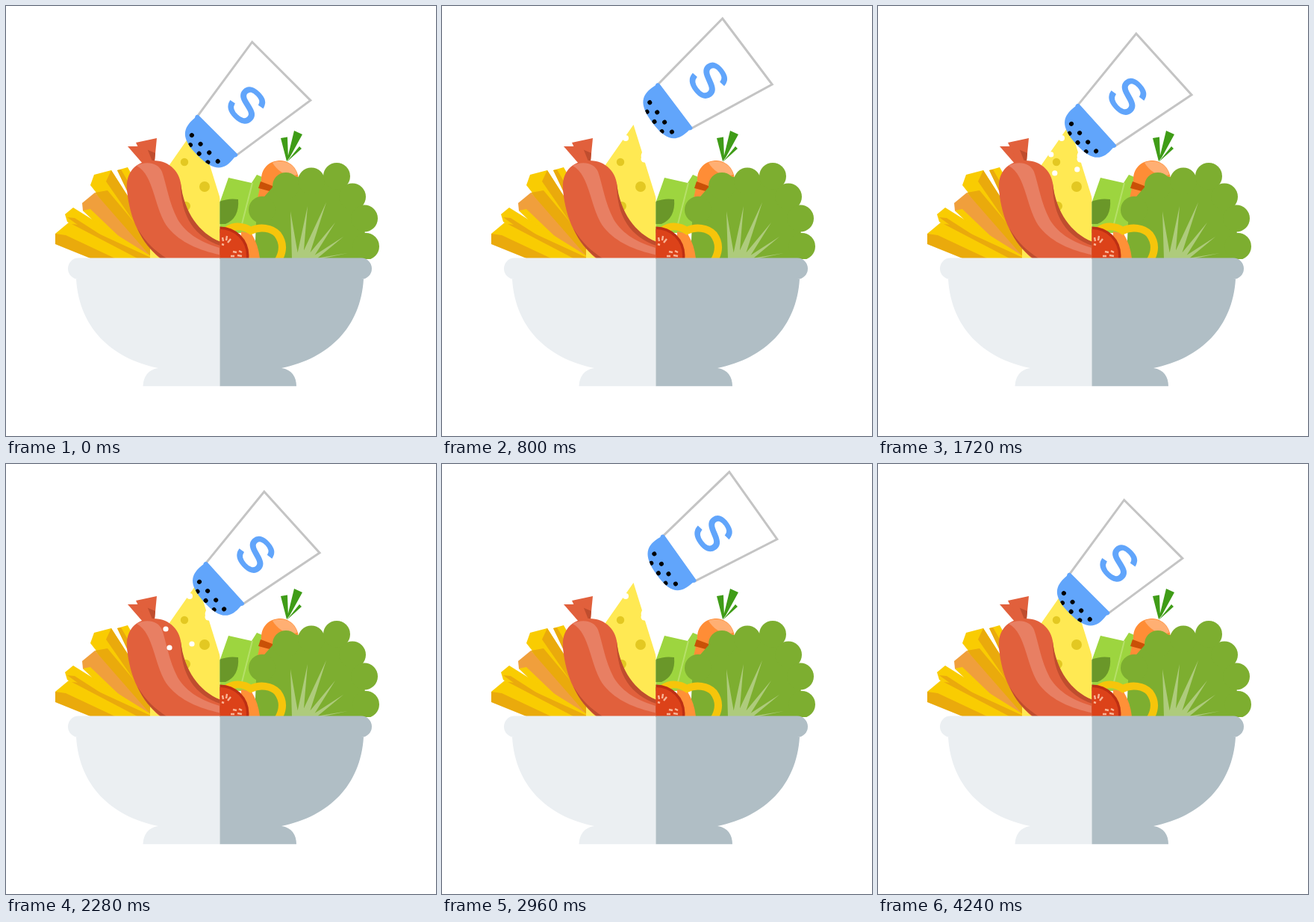
Animation of 576x576 px, one loop 4.28 s. Source, as an HTML page with a canvas:

```html
<!DOCTYPE html>
<html lang="en">
<head>
<meta charset="utf-8">
<title>Salad bowl</title>
<style>
html, body { margin: 0; width: 100%; height: 100%; overflow: hidden; background: #fff; }
canvas { display: block; width: 100vw; height: 100vh; }
</style>
</head>
<body>
<canvas></canvas>
<script>
const SIZE = 576, LOOP = 4280, STEP = 40, MID = 286.5, RIM = 338;
const canvas = document.querySelector('canvas');
const ctx = canvas.getContext('2d');

const fill = (color, d) => { ctx.fillStyle = color; ctx.fill(new Path2D(d)); };

function line(color, width, d) {
  ctx.strokeStyle = color;
  ctx.lineWidth = width;
  ctx.stroke(new Path2D(d));
}

function dots(color, r, points) {
  ctx.fillStyle = color;
  for (const [x, y] of points) {
    ctx.beginPath();
    ctx.arc(x, y, r, 0, 7);
    ctx.fill();
  }
}

function clipped(x, y, w, h, draw) {
  ctx.save();
  ctx.beginPath();
  ctx.rect(x, y, w, h);
  ctx.clip();
  draw();
  ctx.restore();
}

function drawFries() {
  const top = '#f9cc02', side = '#eaaa0c', front = '#f09f3c';
  fill(top, 'M149 220L163 216L180 246L168 258Z');
  fill(side, 'M149 220L154 219L172 250L166 256Z');
  fill(top, 'M113 240L118 226L141 220L205 320L190 338Z');
  fill(side, 'M141 220L205 320V338L134 235Z');
  fill(front, 'M102 264L119 250L204 338H172L103 274Z');
  fill(top, 'M103 274L113 272L182 338H168Z');
  fill(side, 'M119 250L136 247L212 338H196Z');
  fill(top, 'M79 279L90 270L199 338H160L82 289Z');
  fill(side, 'M82 283L92 284L176 338H158Z');
  fill(top, 'M66 305L84 290L190 338H118Z');
  fill(side, 'M98 293L196 338H176L88 292Z');
  fill(side, 'M66 305L80 307L146 338H113L66 319Z');
}

function drawCheese() {
  fill('#ffe953', 'M256.5 159L268 196Q264 204 272 210L290 268V338H193V250Z');
  dots('#fff', 4, [[246, 177]]);
  dots('#fff', 4.5, [[271, 205]]);
  dots('#e3c822', 5.2, [[239, 209]]);
  dots('#e3c822', 7, [[266, 242]]);
  dots('#e3c822', 6, [[241, 268]]);
}

function drawSausage() {
  const red = '#e1603c', dark = '#bf4d2e';
  fill(red, 'M163 188L187 188L197 208L183 211Z');
  fill(red, 'M174 183L202 177L199 208H186Z');
  fill(dark, 'M181 189L200 197L199 208L192 207Z');
  fill(red, 'M180 188L188 188L196 208H184Z');
  fill(red, 'M162 246C160 220 177 207 197 207C220 207 234 223 235 244C238 280 258 306 290 317V345H215C184 322 166 290 162 246Z');
  fill(dark, 'M234 238C239 278 260 306 290 317V322C255 311 234 285 234 238Z');
  fill(dark, 'M176 298C188 318 200 328 215 338H208C194 328 184 316 176 298Z');
  fill('#e87f63', 'M175 214C188 207 204 210 209 222C215 239 218 263 230 286C243 307 264 318 290 325V334C260 328 234 317 218 298C199 276 199 226 175 214Z');
}

function drawCarrot() {
  fill('#ff8d36', 'M342 235C341 217 353 207 368 207C382 208 392 219 392 234L380 262H336Z');
  fill('#ffaf73', 'M357 210C371 204 388 212 390 226C378 230 364 222 357 210Z');
  fill('#c95107', 'M341 235L357 241V249L338 244Z');
  fill('#3f9c17', 'M368 177L377 175.5L378 204L376 208ZM386 167L397 172L380 203L376 208ZM393 188L396 191L376 209Z');
}

function drawLettuce() {
  const green = '#7dae30';
  fill(green, 'M333 338L335 290L340 262L372 226L409 232L443 232L464 255L480 284L482 338Z');
  dots(green, 18, [[375, 241], [409, 234.5], [443, 228], [464, 255.5], [480, 284.5], [482, 322], [343, 273]]);
  fill('#aecb7c', 'M383 338L381 275L392 338ZM389 338L404 268L398 338ZM394 338L429 263L405 338ZM401 338L441 290L411 338ZM407 338L452 309L417 338ZM415 338L458 331L425 338Z');
}

function drawGreens() {
  fill('#9dd53f', 'M298 230L329 237L336 226L343 229L338 304H284V270Z');
  line('#b6e069', 2, 'M330 237L316 292');
  fill('#6a9729', 'M286 262Q298 257 311 259Q313 284 294 292H286Z');
}

function drawPepper() {
  fill('#ff9137', 'M315 302L329 305Q338 320 340 338H315Z');
  line('#f6c50b', 10, 'M296 300C307 293 319 295 328 301C340 295 356 297 364 306C372 317 372 329 364 342');
}

function drawTomato() {
  dots('#bd2f13', 38.5, [[287, 334]]);
  dots('#dc4219', 35, [[287, 334]]);
  line('#f9b596', 2.4, 'M290 310L291 315M296 308L295 314M301 312L297 317M289 319L292 320M304 329L309 330M312 328L316 330M301 335L306 335M310 334L316 335');
}

function drawBowl() {
  const shape = 'M97 337.5H476A14 14.25 0 0 1 476 366H479C475 430 433 472 369 485C383 487 389 497 389 509.2H183.5C184 497 190 487 204 485C140 472 98 430 94 366H97A14 14.25 0 0 1 97 337.5Z';
  clipped(0, 330, MID, 190, () => fill('#ebeff2', shape));
  clipped(MID, 330, 230, 190, () => fill('#b0bec5', shape));
}

function drawSalt(t) {
  const local = t < 2300 ? t : t - 2000;
  if (local < 1000 || t >= 4240) return;
  const left = Math.max(0, 2 - local / 1000);
  const x = 214 + 63.5 * left, y = 221 - 79 * left;
  dots('#fff', 3.6, [[x, y], [x + 5, y + 25], [x + 35, y + 20]]);
}

function drawShaker(t) {
  const phase = t < 4000 ? t % 2000 / 1000 : 0;
  const lift = 1 - Math.abs(1 - phase);
  ctx.save();
  ctx.translate(323 + 43 * lift, 132 - 41.5 * lift);
  ctx.rotate((45 + 10 * lift) * Math.PI / 180);
  const body = 'M-54.5 -64H56L38 58H-36Z';
  fill('#fff', body);
  line('#c4c4c4', 3, body);
  ctx.fillStyle = ctx.strokeStyle = '#61a5fb';
  ctx.font = '66px "Liberation Sans", Arial, sans-serif';
  ctx.textAlign = 'center';
  ctx.lineWidth = 2;
  ctx.fillText('S', 0, 23.5);
  ctx.strokeText('S', 0, 23.5);
  const cap = new Path2D('M-36 56H38Q41 58 38 62C41 84 33 95 1 95C-31 95 -39 84 -37 62Q-40 58 -36 56Z');
  ctx.fill(cap);
  ctx.clip(cap);
  dots('#000', 3, [-23.3, -6.8, 9.7, 26].map(x => [x, 81.5]));
  dots('#000', 3, [-15.5, 1, 17.5].map(x => [x, 92]));
  ctx.restore();
}

function draw(t) {
  const scale = devicePixelRatio || 1;
  const w = Math.round(innerWidth * scale), h = Math.round(innerHeight * scale);
  if (canvas.width !== w || canvas.height !== h) {
    canvas.width = w;
    canvas.height = h;
  }
  ctx.setTransform(w / SIZE, 0, 0, h / SIZE, 0, 0);
  ctx.fillStyle = '#fff';
  ctx.fillRect(0, 0, SIZE, SIZE);
  clipped(0, 0, MID, RIM, () => {
    drawFries();
    drawCheese();
    drawSausage();
  });
  clipped(MID, 0, SIZE - MID, RIM + 1, () => {
    drawGreens();
    drawCarrot();
    drawLettuce();
    drawPepper();
    drawTomato();
  });
  drawBowl();
  drawSalt(t);
  drawShaker(t);
}

const start = performance.now();
function tick() {
  const t = (performance.now() - start) % LOOP;
  draw(Math.floor(t / STEP) * STEP);
  requestAnimationFrame(tick);
}
tick();
</script>
</body>
</html>
```
